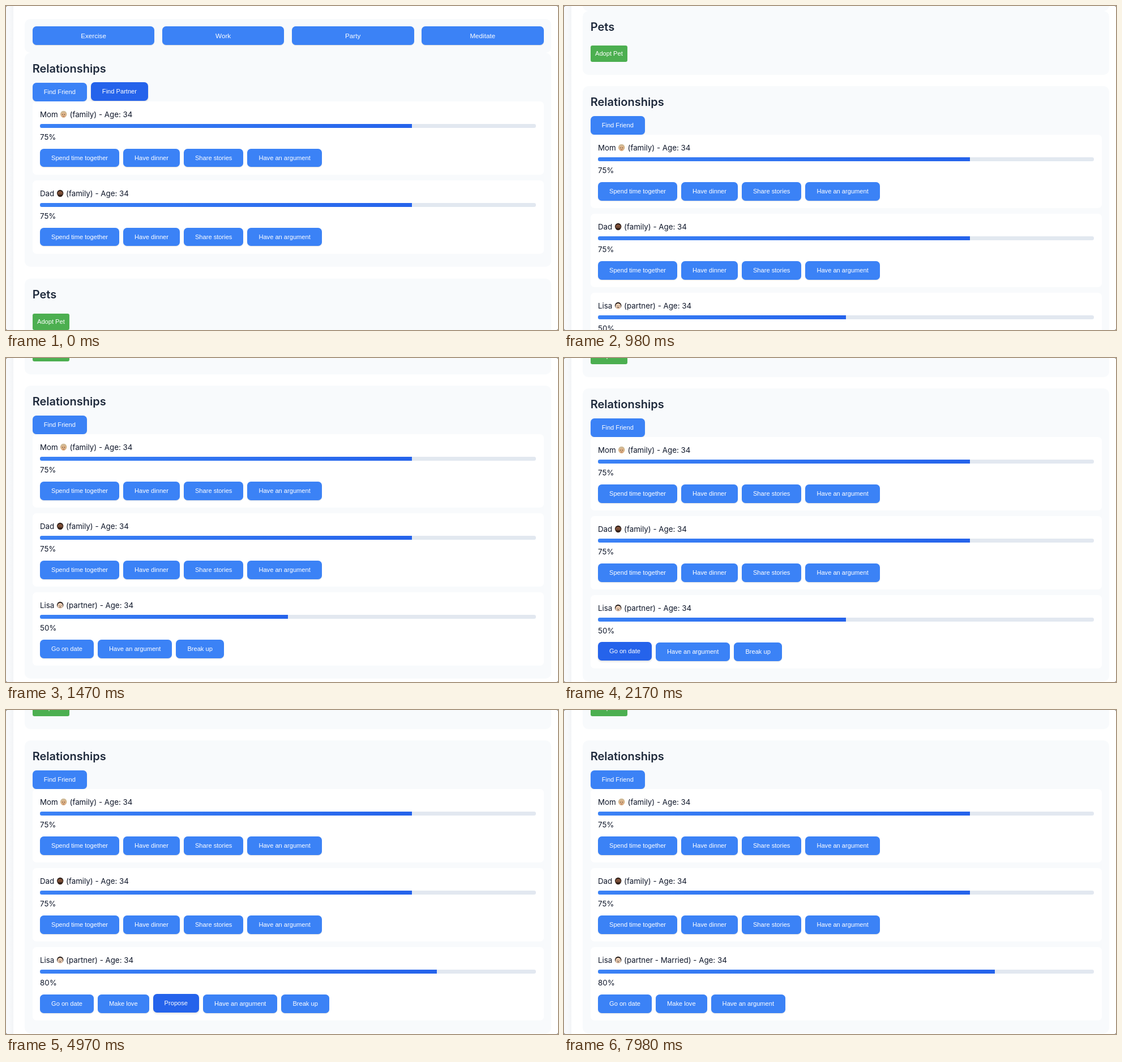
An HTML page for the animation above (8 s loop, 975x574 px).

```html
<!DOCTYPE html>
<html lang="en">
<head>
<meta charset="utf-8">
<title>Relationships</title>
<style>
  html, body { margin: 0; width: 100%; height: 100%; overflow: hidden; background: #fff; }
  #stage { position: relative; width: 975px; height: 574px; overflow: hidden; background: #fff;
    font: 13.333px/21.333px Inter, sans-serif; color: #0f172a; }
  #edge { position: absolute; left: 0; top: 0; width: 13px; height: 100%;
    background: linear-gradient(90deg, #f8f9fb, #f8f9fb 40%, #f2f4f6); }
  #corners { position: absolute; inset: 0; border-radius: 3px; box-shadow: 0 0 0 4px #777; }
  #page { position: absolute; left: 0; top: 0; width: 100%; }
  section { position: absolute; left: 33.33px; width: 929.7px; border-radius: 10px; background: #f8fafc; }
  h2 { position: absolute; left: 13.33px; top: 14px; margin: 0; font-size: 20px; line-height: 29px;
    font-weight: 600; color: #1e293b; white-space: nowrap; }
  .row { position: absolute; left: 13.33px; display: flex; gap: 7px; }
  .btn { box-sizing: border-box; height: 32.5px; padding: 0 20px; border-radius: 6.67px;
    background: #3b82f6; color: #fff; font: 11.11px/32.5px "Liberation Sans", Arial, sans-serif;
    text-align: center; white-space: nowrap; box-shadow: 0 1px 1px rgba(0,0,0,.12); }
  #actions .row { top: 13.33px; width: 903px; gap: 13.33px; }
  #actions .btn { flex: 1 1 0; height: 33.33px; font-size: 11.67px; line-height: 33.33px; }
  #adopt { position: absolute; left: 13.33px; top: 61.8px; height: 29.17px; padding: 0 8.33px;
    line-height: 29.17px; border-radius: 3.33px; background: #4caf50; box-shadow: none; }
  #find { top: 53.5px; }
  .card { position: absolute; left: 13.33px; width: 903px; height: 130px; border-radius: 6.67px; background: #fff; }
  .card > div { position: absolute; left: 13.33px; white-space: nowrap; }
  .who { top: 13.2px; }
  .who svg { width: 13.33px; height: 14px; vertical-align: -2px; }
  .card .bar { top: 40.2px; width: 876px; height: 6.67px; border-radius: 3.33px; overflow: hidden; background: #e2e8f0; }
  .fill { height: 100%; background: linear-gradient(90deg, #3b82f6, #2563eb); }
  .pct { top: 53.2px; }
  .card .row { top: 84px; }
</style>
</head>
<body>
<div id="stage">
  <div id="edge"></div>
  <div id="page">
    <section id="actions" style="top:22.5px;height:60px"><div class="row"></div></section>
    <section id="rel"><h2>Relationships</h2><div class="row" id="find"></div></section>
    <section id="pets" style="height:113.3px"><h2>Pets</h2><div class="btn" id="adopt">Adopt Pet</div></section>
  </div>
  <div id="corners"></div>
</div>
<script>
const LOOP = 8000, STEP = 70, FADE = 200, TOP = 82.5;
const MET = 280, SCROLL_AT = 910, MARRIED = 7070;
const $ = s => document.querySelector(s);

function add(parent, cls, html = '') {
  const el = document.createElement('div');
  el.className = cls;
  el.innerHTML = html;
  parent.append(el);
  return el;
}

const buttons = (row, labels) => labels.map(s => add(row, 'btn', s));

function face(hair, skin, extra) {
  return `<svg viewBox="0 0 14 14"><ellipse cx="7" cy="6.6" rx="6" ry="6.2" fill="${hair}"/>
    <ellipse cx="7" cy="8" rx="4.9" ry="5.4" fill="${skin}"/>${extra}
    <path d="M4.6 7.4h1.2M8.2 7.4h1.2" stroke="#3a2a20" stroke-width="1.2"/></svg>`;
}

const faces = {
  mom: face('#cdb48a', '#deb489', '<path d="M2 7Q3 3.5 9 3Q12 4 12 7Q13 1 7 .6Q1 1 2 7" fill="#cfbb98"/><path d="M5.2 10.6h3.6" stroke="#a5624c"/>'),
  dad: face('#2b1d17', '#83533a', '<path d="M2 7.6Q3 10 7 9.2Q11 10 12 7.6Q12 13.6 7 13.6Q2 13.6 2 7.6" fill="#35231b"/>'),
  lisa: face('#241c1a', '#f3d3b8', '<path d="M3.8 10.4Q7 8.6 10.2 10.4Q7 11.4 3.8 10.4" fill="#2b211e"/>')
};

function card(i, name, icon, role, pct, labels) {
  const el = add($('#rel'), 'card');
  el.style.top = 86.4 + 140 * i + 'px';
  add(el, 'who', `${name} ${icon} (<span>${role}</span>) - Age: 34`);
  const fill = add(add(el, 'bar'), 'fill');
  fill.style.width = pct + '%';
  const text = add(el, 'pct', pct + '%');
  return { el, fill, text, role: el.querySelector('span'), btns: buttons(add(el, 'row'), labels) };
}

buttons($('#actions .row'), ['Exercise', 'Work', 'Party', 'Meditate']);
const [, findPartner] = buttons($('#find'), ['Find Friend', 'Find Partner']);
const family = ['Spend time together', 'Have dinner', 'Share stories', 'Have an argument'];
card(0, 'Mom', faces.mom, 'family', 75, family);
card(1, 'Dad', faces.dad, 'family', 75, family);
const lisa = card(2, 'Lisa', faces.lisa, 'partner', 50,
  ['Go on date', 'Make love', 'Propose', 'Have an argument', 'Break up']);
const [date, love, propose, argue, breakUp] = lisa.btns;

// Clicks on "Go on date"; each rebuilds the row, so its hover fades in again.
const dates = [3010, 3500, 3990];

// [button, [pointer enters, pointer leaves], ...]
const hovers = [
  [findPartner, [-999, 9999]],
  [date, [1950, 3009], [3005, 3499], [3490, 3989], [3980, 4610]],
  [love, [4670, 4780]],
  [propose, [4765, 5170], [6440, 7069]],
  [argue, [5230, 5380], [6090, 6430], [7060, 7760]],
  [breakUp, [5390, 6080]]
];
const rebuilds = [...dates, MARRIED];

// Momentum scroll with a rubber-band return, one value per step.
const scrolls = [22, 74, 128, 164, 174, 173, 171, 169, 167, 165.5, 164, 163, 162];

const ease = x => {
  x = Math.min(1, Math.max(0, x));
  return 1 - (1 - x) ** 2 * (1 + x * .4);
};

function hoverAt(spans, t) {
  let k = 0;
  for (const [enter, leave] of spans) {
    if (t < enter) continue;
    if (t >= leave && rebuilds.some(r => r - leave === 1)) continue;
    k += ease((t - enter) / FADE) - ease((t - leave) / FADE);
  }
  return Math.min(1, Math.max(0, k));
}

function paintButton(el, k) {
  const mix = (a, b) => Math.round(a + (b - a) * k);
  el.style.background = `rgb(${mix(59, 37)},${mix(130, 99)},${mix(246, 235)})`;
  el.style.transform = `translateY(${-k}px)`;
  el.style.boxShadow = `0 ${1 + k}px ${1 + 2 * k}px rgba(0,0,0,.12)`;
}

const show = (el, on) => { el.style.display = on ? '' : 'none'; };

function place(el, top, height) {
  el.style.top = top + 'px';
  if (height) el.style.height = height + 'px';
}

function render(time) {
  const t = Math.floor(time / STEP) * STEP;
  const met = t >= MET, married = t >= MARRIED;

  place($('#rel'), met ? TOP + 133.2 : TOP, met ? 519.8 : 379.8);
  place($('#pets'), met ? TOP : TOP + 400.3);
  show(findPartner, !met);
  show(lisa.el, met);

  const i = Math.min(scrolls.length - 1, Math.floor((t - SCROLL_AT) / STEP));
  $('#page').style.transform = `translateY(${i < 0 ? 0 : -scrolls[i]}px)`;

  const pct = 50 + 10 * dates.filter(d => t >= d).length + '%';
  lisa.fill.style.width = pct;
  lisa.text.textContent = pct;
  lisa.role.textContent = married ? 'partner - Married' : 'partner';
  show(love, t >= dates[0]);
  show(propose, t >= dates[2] && !married);
  show(breakUp, !married);

  for (const [el, ...spans] of hovers) paintButton(el, hoverAt(spans, t));
}

const start = performance.now();
function tick() {
  render((performance.now() - start) % LOOP);
  requestAnimationFrame(tick);
}
tick();
</script>
</body>
</html>
```
